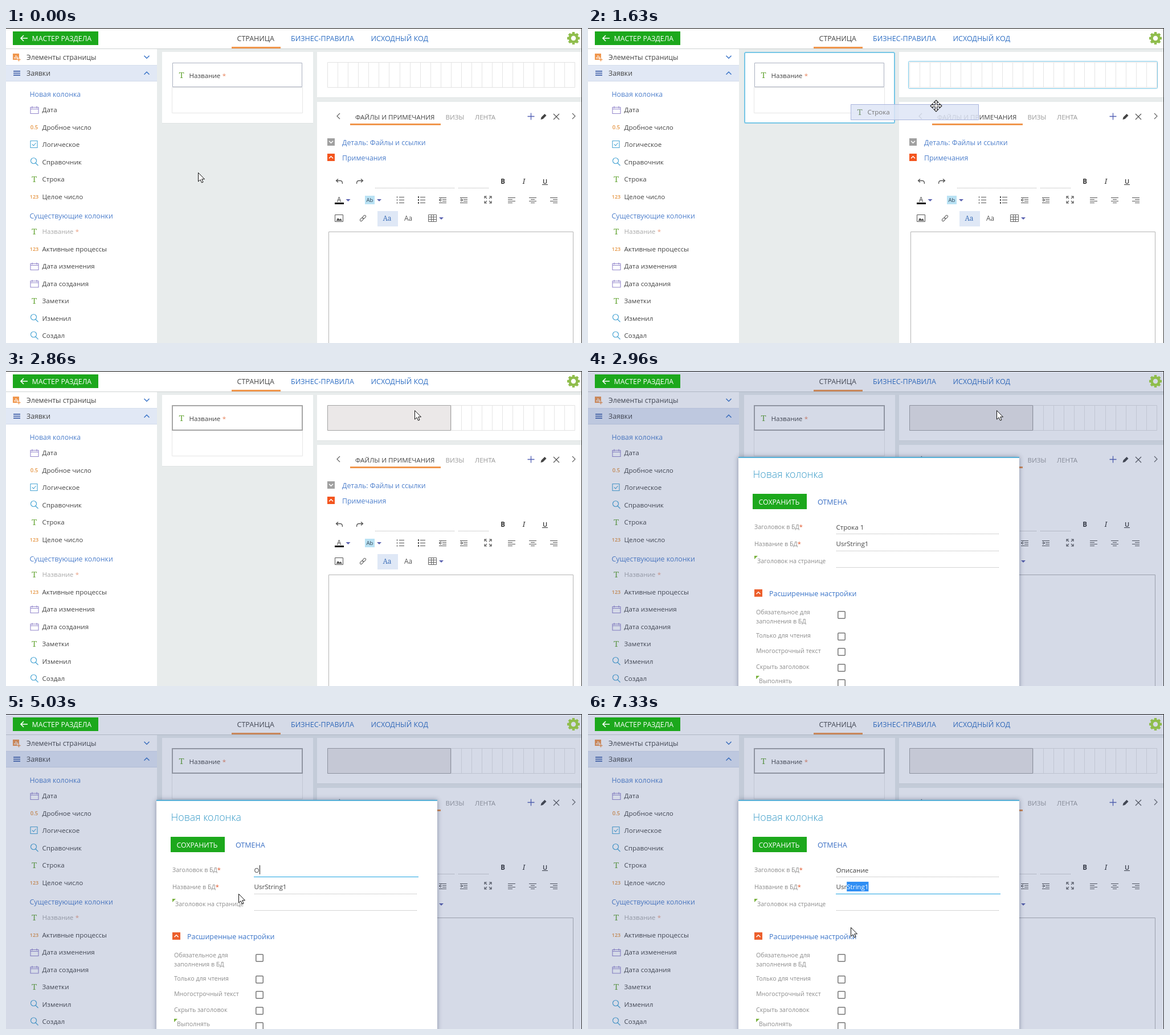
These frames come from a looping animation (1011x554 px, 8000 ms). An HTML page with a canvas:

```html
<!DOCTYPE html>
<html lang="ru">
<head>
<meta charset="utf-8">
<style>
html, body { margin: 0; width: 100%; height: 100%; overflow: hidden; background: #fff; }
canvas { display: block; }
</style>
</head>
<body>
<canvas id="stage" width="1011" height="554"></canvas>
<script>
const c = document.getElementById('stage').getContext('2d');
const LOOP = 8000;
const SANS = '"Open Sans", sans-serif', SERIF = '"Noto Serif", serif';
const BLUE = '#3a74c8', LINK = '#4f80cc', ORANGE = '#f0964c', GREEN = '#6aa83c', INK = '#444', GREY = '#8c8c8c';
const FIELD = 11.6, FIELD_X = 436;

function fill(x, y, w, h, color) {
  c.fillStyle = color;
  c.fillRect(x, y, w, h);
}

// Outline whose outer edge is the given box
function frame(x, y, w, h, color, lw = 1, r = 0) {
  c.strokeStyle = color;
  c.lineWidth = lw;
  c.setLineDash([]);
  c.beginPath();
  c.roundRect(x + lw / 2, y + lw / 2, w - lw, h - lw, r);
  c.stroke();
}

function text(s, x, y, size, color, { font = SANS, style = '', align = 'left' } = {}) {
  c.font = `${style} ${size}px ${font}`;
  c.fillStyle = color;
  c.textAlign = align;
  c.fillText(s, x, y);
  return c.measureText(s).width;
}

function path(d, x, y, color, lw = 1.2, inside) {
  const p = new Path2D(d);
  c.save();
  c.translate(x, y);
  if (inside) { c.fillStyle = inside; c.fill(p); }
  if (lw) { c.strokeStyle = color; c.lineWidth = lw; c.stroke(p); }
  c.restore();
}

function dotted(x0, x1, y) {
  c.strokeStyle = '#aaa';
  c.lineWidth = 1;
  c.setLineDash([1, 1]);
  c.beginPath();
  c.moveTo(x0, y + .5);
  c.lineTo(x1, y + .5);
  c.stroke();
  c.setLineDash([]);
}

const chevron = (x, y, up, color = BLUE, s = 4.5) =>
  path(up ? `M${-s} ${s / 2}L0 ${-s / 2}L${s} ${s / 2}` : `M${-s} ${-s / 2}L0 ${s / 2}L${s} ${-s / 2}`, x, y, color, 1.5);
const caretDown = (x, y) => path('M-4-2H4L0 2Z', x, y, '', 0, '#5b62b0');

// Column type icons, centred on (x, y)
const icons = {
  text: (x, y, color = GREEN) => text('T', x, y + 5.3, 15, color, { font: SERIF, align: 'center' }),
  int: (x, y) => text('123', x, y + 3.3, 9, '#e59440', { style: '600', align: 'center' }),
  float: (x, y) => text('0.5', x, y + 3.3, 9.5, '#e59440', { style: '600', align: 'center' }),
  date: (x, y) => path('M-6.5-4.5H7.5V6.5H-6.5ZM-6.5-1.5H7.5M-3.5-6.5V-3M4.5-6.5V-3', x, y, '#9488cc', 1.1),
  bool: (x, y) => path('M-6-6H6V6H-6ZM-3 0L-.5 2.5L3.5-2.5', x - .5, y - .5, '#4ba6d4', 1.1),
  lookup: (x, y) => path('M4-2A5 5 0 1 1-6-2A5 5 0 1 1 4-2M2.5 2L7 6.5', x, y, '#4ba6d4', 1.2),
};

const newColumns = [['date', 'Дата'], ['float', 'Дробное число'], ['bool', 'Логическое'],
  ['lookup', 'Справочник'], ['text', 'Строка'], ['int', 'Целое число']];
const oldColumns = [['text', 'Название'], ['int', 'Активные процессы'], ['date', 'Дата изменения'],
  ['date', 'Дата создания'], ['text', 'Заметки'], ['lookup', 'Изменил'], ['lookup', 'Создал']];

function columnList(list, y0) {
  list.forEach(([icon, name], i) => {
    const y = y0 + i * 30.5, used = name === 'Название';
    icons[icon](49.5, y);
    const w = text(name, 63.5, y + 4.2, 11.6, used ? '#aaa' : INK);
    if (used) text('*', 67 + w, y + 4.2, 11.6, '#eba183');
  });
}

function header() {
  fill(0, 0, 1011, 36, '#fff');
  fill(0, 36, 1011, 1, '#cfd3d3');
  text('СТРАНИЦА', 405.5, 23, 12.5, INK);
  text('БИЗНЕС-ПРАВИЛА', 500, 23, 12.5, '#2f6fc4');
  text('ИСХОДНЫЙ КОД', 640.5, 23, 12.5, '#2f6fc4');
  fill(396, 33, 86, 3, ORANGE);
}

function headerButtons() {
  fill(12, 6, 150, 24, '#1ca81c');
  path('M12 0H0M5-5L0 0L5 5', 26, 18, '#fff', 1.6);
  text('МАСТЕР РАЗДЕЛА', 45.5, 22.8, 12.35, '#fff');
  c.strokeStyle = '#8fbd4c';
  c.lineWidth = 4.5;
  c.beginPath();
  c.arc(996, 18, 6.5, 0, 7);
  for (let i = 0; i < 8; i++) {
    const a = i * Math.PI / 4, x = Math.cos(a), y = Math.sin(a);
    c.moveTo(996 + 7 * x, 18 + 7 * y);
    c.lineTo(996 + 11 * x, 18 + 11 * y);
  }
  c.stroke();
}

function sidebar() {
  fill(0, 37, 265, 517, '#fff');
  fill(12, 45, 11, 11, ORANGE);
  path('M3 9V6M5.5 9V3M8 9V5', 12, 45, '#fff', 1.2);
  path('M-3 0H3M0-3V3', 22.5, 55.5, '#fff', 4);
  path('M-3 0H3M0-3V3', 22.5, 55.5, ORANGE, 1.4);
  text('Элементы страницы', 36, 55.5, 12.3, INK);
  chevron(247, 51, false);
  fill(0, 65, 265, 29, '#e1e8f5');
  fill(0, 65, 265, 1, '#d6deec');
  fill(0, 93, 265, 1, '#d0d9e9');
  for (const y of [75, 78.5, 82]) fill(13, y, 12, 2, '#5874b4');
  text('Заявки', 36, 84.2, 12.3, INK);
  chevron(247, 79.5, true);
  text('Новая колонка', 41.5, 121, 12.35, LINK);
  columnList(newColumns, 144);
  text('Существующие колонки', 41.5, 335.3, 12.35, LINK);
  columnList(oldColumns, 358);
}

function cards(t) {
  const dragging = t >= 1100 && t < 2860, moved = t >= 1760;
  fill(274, 42, 265, 126, '#fff');
  fill(546, 42, 464, 81, '#fff');
  fill(274, 167, 265, 1, '#dfe3e3');
  fill(546, 122, 464, 1, '#dfe3e3');
  frame(291, 104, 230, 46, '#e6e6e6');
  fill(292, 61, 228, 43, dragging && moved ? '#fef9f5' : '#fff');
  if (moved) frame(291, 60, 230, 45, '#a6a6a6', 2);
  else frame(292, 61, 228, 43, '#aab0c0');
  icons.text(308, 82.5);
  const w = text('Название', 321.5, 87.8, 11.6, INK);
  text('*', 325 + w, 87.8, 11.6, '#e8835c');

  frame(564, 60, 435, 45, '#e2e2e2');
  for (let i = 1; i < 24; i++) fill(Math.round(564 + i * 18.08), 61, 1, 43, '#e5e5e5');
  if (moved) {
    fill(564, 60, 217, 45, '#ebe8e8');
    frame(564, 60, 217, 45, '#a3a3a3');
  }
  if (dragging) {
    frame(274, 42, 265, 126, '#76c6e6', t >= 1480 && !moved ? 2 : 1, 2);
    frame(562, 58, 438, 49, '#76c6e6', moved ? 2 : 1, 2);
  }
}

function lines(x, y, rows) {
  rows.forEach(([a, b], i) => fill(x + a, y - 5 + i * 3, b - a, 1, '#555'));
}

function editor() {
  fill(546, 130, 464, 424, '#fff');
  path('M3-5L-2 0L3 5', 583, 155, '#666', 1.2);
  text('ФАЙЛЫ И ПРИМЕЧАНИЯ', 613, 161.2, 11.6, INK);
  text('ВИЗЫ', 771.5, 161.2, 11.6, '#999');
  text('ЛЕНТА', 823, 161.2, 11.6, '#999');
  fill(604, 168, 159, 3, ORANGE);
  path('M-6 0H6M0-6V6', 921.5, 155.5, '#5360b4', 1.3);
  path('M-5 5L-4 1L2-5L5-2L-1 4Z', 943.5, 156, '', 0, '#444');
  path('M-5-5L5 5M5-5L-5 5', 966, 156, '#555', 1.2);
  path('M-3-5L2 0L-3 5', 997, 155, '#666', 1.2);

  fill(564, 194, 13, 13, '#a0a0a0');
  chevron(570.5, 200.5, false, '#fff', 3.5);
  text('Деталь: Файлы и ссылки', 590, 206.2, 12.35, LINK);
  fill(564, 221, 13, 13, '#f4551e');
  chevron(570.5, 227.5, true, '#fff', 3.5);
  text('Примечания', 590, 233.2, 12.35, LINK);

  const undo = 'M-2-4.5L-5.5-1.5L-2 1.5M-5.5-1.5H2Q5.5-1.5 5.5 4';
  path(undo, 585, 270, '#555', 1.3);
  c.save();
  c.scale(-1, 1);
  path(undo, -621, 270, '#555', 1.3);
  c.restore();
  dotted(648, 788, 281);
  dotted(794, 848, 281);
  text('B', 872, 274, 11.5, '#333', { style: 'bold', align: 'center' });
  text('I', 909, 274, 12, '#333', { font: SERIF, style: 'italic', align: 'center' });
  text('U', 946, 273.5, 11, '#333', { style: '600', align: 'center' });
  fill(941, 275, 10, 1, '#333');

  text('A', 584.5, 305.5, 12, '#444', { align: 'center' });
  fill(577, 307, 16, 3, '#111');
  caretDown(600.5, 303);
  fill(630, 295, 17, 15, '#b9e2f4');
  text('Ab', 638.5, 306, 9.5, '#345', { align: 'center' });
  caretDown(655, 303);
  for (const y of [297, 302, 307]) {
    fill(690, y, 9, 1, '#555');
    fill(686, y - 1, 1, 3, '#555');
    fill(727, y, 9, 1, '#555');
    fill(723, y - 1, 2, 3, '#555');
  }
  const indented = [[0, 13], [6, 13], [6, 13], [0, 13]];
  lines(760, 303, indented);
  path('M5-3L1 0L5 3M1 0H6', 759, 302.5, '#555', 1);
  lines(797, 303, indented);
  path('M1-3L5 0L1 3M0 0H5', 797, 302.5, '#555', 1);
  path('M-6-2V-6H-2M2-6H6V-2M6 2V6H2M-2 6H-6V2M-6-6L-2-2M6-6L2-2M6 6L2 2M-6 6L-2 2', 846, 302, '#555', 1.1);
  lines(881, 303, [[0, 13], [0, 8], [0, 13], [0, 8]]);
  lines(918, 303, [[0, 13], [3, 10], [0, 13], [3, 10]]);
  lines(955, 303, [[0, 13], [5, 13], [0, 13], [5, 13]]);

  frame(577, 328, 15, 13, '#555');
  path('M-5 4L-2-1L1 2L3 0L5.5 4Z', 584.5, 335, '', 0, '#555');
  c.save();
  c.translate(626.5, 334.5);
  c.rotate(-Math.PI / 4);
  frame(-7, -2.5, 8, 5, '#666', 1.1, 2);
  frame(-1, -2.5, 8, 5, '#666', 1.1, 2);
  c.restore();
  fill(652, 322, 36, 27, '#dfe8f6');
  text('Aa', 669, 339, 12, '#3d6fb8', { font: SERIF, align: 'center' });
  text('Aa', 706, 339, 11.8, '#555', { align: 'center' });
  path('M-7-6H7V6H-7ZM-7-2H7M-7 2H7M-2-6V6M2-6V6', 748.5, 334.5, '#666', 1);
  caretDown(764, 335);
  frame(566, 358, 430, 210, '#b4b4b4');
}

function tile(x, y, lifted) {
  c.globalAlpha = lifted ? .85 : 1;
  fill(x, y, 225, 28, '#dfe5f6');
  c.globalAlpha = 1;
  frame(x, y, 225, 28, '#aab5dd');
  icons.text(x + 16, y + 14, lifted ? '#7d9a78' : GREEN);
  text('Строка', x + 29.5, y + 18.2, 11.6, lifted ? '#777' : INK);
}

const widthOf = s => {
  c.font = `${FIELD}px ${SANS}`;
  return c.measureText(s).width;
};

// Field value with the part right of selX highlighted
function value(s, y, selX = Infinity) {
  let i = 0;
  while (i < s.length && FIELD_X + widthOf(s.slice(0, i + 1)) - 3 <= selX) i++;
  text(s, FIELD_X - .5, y, FIELD, INK);
  if (i === s.length) return;
  const x = FIELD_X - .5 + widthOf(s.slice(0, i));
  fill(x, y - 13, widthOf(s.slice(i)), 17, '#2f8ef4');
  text(s.slice(i), x, y, FIELD, '#fff');
}

function label(s, x, y, mark) {
  const w = text(s, x, y, 10.65, GREY);
  if (mark) text('*', x + w, y, 11, '#e2572b');
}

const corner = (x, y) => path('M0 0H6L0 6Z', x, y, '', 0, '#7cb342');

function dialog(t) {
  c.save();
  c.shadowColor = 'rgba(40,50,80,.45)';
  c.shadowBlur = 8;
  fill(264, 151, 493, 420, '#fff');
  c.restore();
  fill(264, 151, 493, 2, '#56b0d8');
  text('Новая колонка', 289.5, 188, 17.8, '#3a9cc8', { style: '300' });
  fill(289, 216, 95, 27, '#1ca81c');
  text('СОХРАНИТЬ', 299.5, 234.5, 12.35, '#fff');
  text('ОТМЕНА', 403, 234.5, 12.5, '#3a6fc4');

  label('Заголовок в БД', 292, 278, true);
  label('Название в БД', 292, 307.5, true);
  corner(292, 325);
  label('Заголовок на странице', 297, 338.2);
  const focus = t < 3500 ? 0 : t < 6900 ? 1 : 2;
  [286, 316, 345].forEach((y, i) => {
    if (focus === i + 1) fill(435, y, 289, 1, '#1fa3e2');
    else dotted(436, 722, y);
  });

  if (t < 5030) value('Строка 1', 278.5, focus ? cursorAt(t)[0] : Infinity);
  else {
    const s = 'Описание'.slice(0, 1 + Math.round((t - 5030) / 75.7));
    value(s, 278.5);
    if (t < 5900 || t >= 6430 && focus === 1) fill(Math.round(FIELD_X + widthOf(s)), 266, 1, 16, '#222');
  }
  value('UsrString1', 308, focus === 2 ? cursorAt(Math.min(t, 7150))[0] : Infinity);

  fill(292, 384, 14, 13, '#ec5f2c');
  chevron(299, 390.5, true, '#fff', 3.5);
  text('Расширенные настройки', 318, 396.3, 12.45, '#3a74c8');
  label('Обязательное для', 295, 428);
  label('заполнения в БД', 295, 444);
  label('Только для чтения', 295, 469.2);
  label('Многострочный текст', 295, 496.2);
  label('Скрыть заголовок', 295, 524.2);
  corner(295, 536);
  label('Выполнять', 300, 549);
  for (const y of [422, 460, 487, 515, 542]) frame(438, y, 14, 14, '#777', 1.5, 1.5);
}

// Bursts of activity: start, end, number of screen updates
const bursts = [[0, 0, 1], [360, 800, 7], [1100, 1830, 11], [1930, 2600, 10], [2860, 3630, 11], [3700, 3860, 3],
  [4200, 4330, 2], [5030, 5560, 8], [5900, 5900, 1], [6430, 6430, 1], [6730, 7330, 9]];

// Time of the latest screen update
function lastUpdate(t) {
  const [start, end, n] = bursts.findLast(b => b[0] <= t);
  const step = (end - start) / (n - 1) || 1;
  return start + step * Math.floor((Math.min(t, end) - start) / step + 1e-6);
}

// Pointer track: time, x, y
const track = [[0, 337, 254], [290, 337, 254], [800, 185, 253], [1099, 185, 253], [1100, 212, 248],
  [1611, 611, 137], [1830, 683, 97], [1860, 683, 97], [2153, 710, 74], [2600, 719, 74], [2859, 719, 74],
  [2860, 717, 69], [2937, 717, 69], [3500, 488, 275], [3630, 471, 275], [3860, 434, 282], [4140, 434, 282],
  [4330, 408, 316], [6670, 408, 316], [6950, 496, 304], [7150, 455, 304], [7330, 461, 375], [LOOP, 461, 375]];

function cursorAt(t) {
  const i = track.findIndex(k => k[0] > t);
  const [t0, x0, y0] = track[i - 1], [t1, x1, y1] = track[i];
  const f = (t - t0) / (t1 - t0);
  const e = (f + f * f * (3 - 2 * f)) / 2;
  return [Math.round(x0 + (x1 - x0) * e), Math.round(y0 + (y1 - y0) * e)];
}

function pointer(x, y, t) {
  const inField = t > 2900 && x >= 435 && x < 723 && (y > 263 && y < 288 || y > 293 && y < 317);
  if (inField) path('M-3-8H-1L0-7L1-8H3M0-7V7M-3 8H-1L0 7L1 8H3', x + .5, y, '#111', 1);
  else if (t < 2860 && (x < 259 || t >= 1100))
    path('M0-10L4-6H1.5V-1.5H6V-4L10 0L6 4V1.5H1.5V6H4L0 10L-4 6H-1.5V1.5H-6V4L-10 0L-6-4V-1.5H-1.5V-6H-4Z', x, y, '#222', 1.1, '#fff');
  else path('M0 0V15.5L3.6 12.3L6 17.5L8.5 16.5L6.2 11.3H11Z', x + .5, y + .5, '#111', 1, '#fff');
}

function draw(now) {
  const t = lastUpdate(now % LOOP), [x, y] = cursorAt(t);
  const open = t > 2900;
  fill(0, 0, 1011, 554, '#e8ecec');
  header();
  sidebar();
  cards(t);
  editor();
  if (t < 1100) {
    if (x < 259) tile(34, 252, false);
  } else if (t < 2860) tile(x - 150, y - 3, true);
  if (open) fill(0, 0, 1011, 554, 'rgba(60,80,140,.21)');
  headerButtons();
  if (open) dialog(t);
  pointer(x, y, t);
  fill(0, 0, 1011, 1, '#111');
  fill(1010, 0, 1, 554, '#333');
  requestAnimationFrame(draw);
}
requestAnimationFrame(draw);
</script>
</body>
</html>
```
